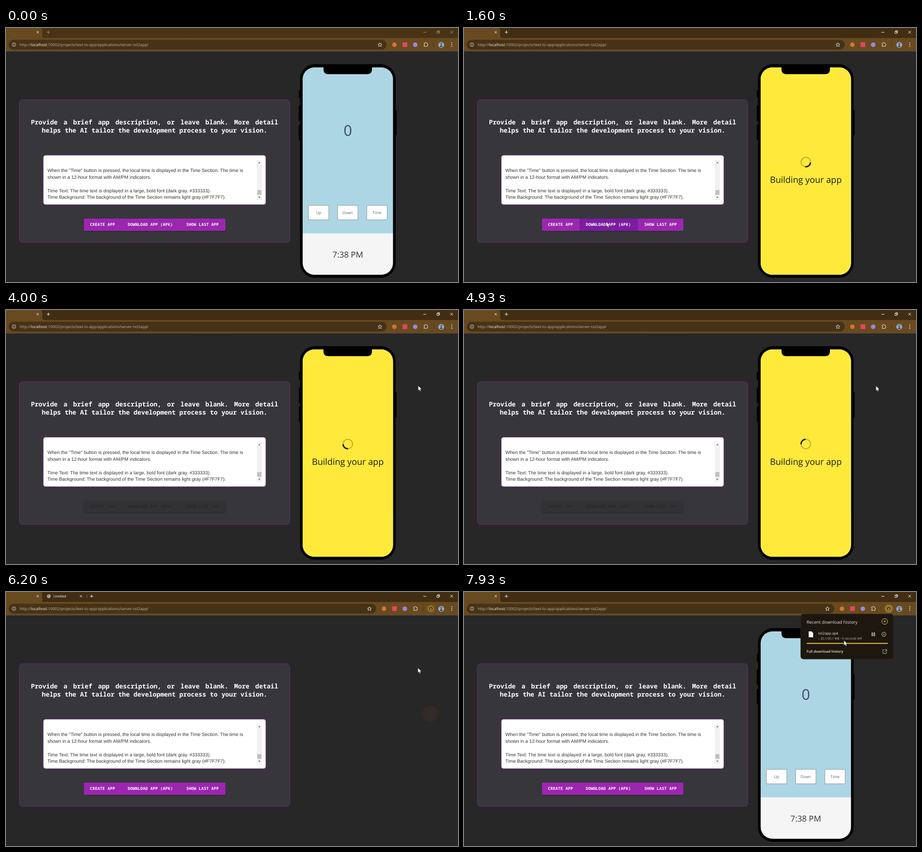
An HTML page for the animation above (8 s loop, 998 by 561 pixels).

```html
<!DOCTYPE html>
<html lang="en">
<head>
<meta charset="utf-8">
<title>App builder</title>
<style>
  html, body { margin: 0; width: 100%; height: 100%; overflow: hidden; background: #272728; }
  svg { position: absolute; left: 0; top: 0; width: 998px; height: 561px; }
  text {
    font-family: "Open Sans", "Noto Sans", sans-serif; white-space: pre;
    text-rendering: geometricPrecision;
  }
  .mid { text-anchor: middle; }
  .line { fill: none; stroke: currentColor; stroke-width: 1; }

  .prompt {
    position: absolute; left: 55px; top: 200px; width: 546px; margin: 0;
    font: bold 14.07px/18px "Noto Sans Mono", "DejaVu Sans Mono", monospace;
    color: #fff; text-align: center; text-rendering: geometricPrecision;
  }
  .prompt span { display: block; white-space: nowrap; }
  .prompt span:first-child { text-align-last: justify; }
  .area text { font: 10.42px "Liberation Sans", Arial, sans-serif; fill: #333; }
  .btns text {
    font: bold 8.9px "Noto Sans Mono", "DejaVu Sans Mono", monospace; letter-spacing: .2px;
  }

  /* Every animation shares the 8 s loop */
  .step, .flow { animation-duration: 8s; animation-iteration-count: infinite; }
  .step { animation-timing-function: step-end; }
  .flow { animation-timing-function: linear; }

  .bar { animation-name: bar; }
  .glyphs { animation-name: glyphs; }
  .shift { animation-name: shift; }
  .tab2 { animation-name: tab2; }
  .plus { animation-name: plus; }
  .dl { animation-name: dl; }
  .ring { animation-name: ring; }
  .glow { animation-name: glow; }
  .phone { animation-name: phone; }
  .build { animation-name: build; }
  .clock { animation-name: clock; }
  .loading { animation-name: loading; }
  .popup { animation-name: popup; }
  .spin { animation-name: spin; }
  .fly { animation-name: fly; }
  .cursor { animation-name: cursor; animation-timing-function: ease-in-out; }
  .btn { animation-name: btn; }
  .btn.hot { animation-name: hot; }
  .label { animation-name: label; }

  @keyframes bar { 0% { fill: #483315 } 17.5%, 100% { fill: #412d12 } }
  @keyframes glyphs { 0% { color: #a5967f } 17.5%, 100% { color: #fff } }
  @keyframes shift { 0% { transform: none } 77.4%, 100% { transform: translateX(-23px) } }
  @keyframes tab2 { 0%, 80.8%, 100% { visibility: hidden } 76.6% { visibility: visible } }
  @keyframes plus { 0%, 80.8%, 100% { transform: none } 76.6% { transform: translateX(95.5px) } }
  @keyframes dl { 0% { visibility: hidden } 77.4%, 100% { visibility: visible } }
  @keyframes ring { 0%, 98.9%, 100% { stroke-dasharray: 36 0 } 87% { stroke-dasharray: 18 18 } }
  @keyframes glow { 0% { opacity: .4 } 87% { opacity: 0 } 94.1%, 100% { opacity: 1 } }
  @keyframes phone { 0%, 80.8%, 100% { visibility: visible } 75.8% { visibility: hidden } }
  @keyframes build { 0%, 75.8%, 100% { opacity: 0 } 18.3% { opacity: 1 } }
  @keyframes clock { 0%, 92.5%, 100% { opacity: 1 } 18.3% { opacity: 0 } }
  @keyframes loading { 0%, 92.5%, 100% { opacity: 0 } 80.8% { opacity: 1 } }
  @keyframes popup { 0% { visibility: hidden } 94.1%, 100% { visibility: visible } }
  @keyframes spin { from { transform: rotate(89deg) } to { transform: rotate(3955deg) } }
  @keyframes fly {
    0%, 77.3% { transform: translate(937px, 270px); opacity: 0 }
    77.5% { transform: translate(937px, 269px); opacity: .12 }
    81% { transform: translate(937px, 180px); opacity: 1 }
    85.5% { transform: translate(937px, 80px); opacity: 1 }
    87%, 100% { transform: translate(937px, 60px); opacity: 0 }
  }
  @keyframes cursor {
    0%, 4% { transform: translate(668px, 466px); opacity: 0 }
    4.1% { transform: translate(668px, 466px); opacity: 1 }
    11.6%, 22.5% { transform: translate(314px, 428px); animation-timing-function: ease-in }
    28% { transform: translate(600px, 484px); animation-timing-function: linear }
    33.4% { transform: translate(940px, 350px); animation-timing-function: ease-out }
    44%, 50% { transform: translate(910px, 167px) }
    60%, 84% { transform: translate(909.5px, 167.5px) }
    90.5%, 94.2% { transform: translate(937px, 38px) }
    98.6%, 100% { transform: translate(839px, 107px); opacity: 1 }
  }
  @keyframes btn {
    0%, 20.6%, 77.3%, 100% { fill: #9c27b0 }
    22.5%, 75.8% { fill: #313035 }
  }
  @keyframes hot {
    0%, 8.8%, 77.3%, 100% { fill: #9c27b0 }
    11.6%, 20.6% { fill: #7b1fa2 }
    22.5%, 75.8% { fill: #313035 }
  }
  @keyframes label {
    0%, 20.6%, 77.3%, 100% { fill: #fff }
    22.5%, 75.8% { fill: #28272b }
  }
</style>
</head>
<body>
<svg viewBox="0 0 998 561">
  <defs>
    <path id="x" d="M-2.3-2.3 2.3 2.3M2.3-2.3-2.3 2.3"/>
    <path id="down" d="M0-3V2.6M-2.5.3 0 2.8 2.5.3"/>
    <linearGradient id="face" x2="0" y2="1">
      <stop stop-color="#6f8fb8"/><stop offset="1" stop-color="#c3c8d2"/>
    </linearGradient>
    <clipPath id="screen"><rect x="655" y="87" width="199.5" height="458" rx="26"/></clipPath>
    <filter id="soft" x="-10%" y="-30%" width="120%" height="170%">
      <feDropShadow dx="0" dy="1" stdDeviation="1" flood-opacity=".3"/>
    </filter>
  </defs>

  <!-- Browser frame -->
  <rect class="step bar" width="998" height="30"/>
  <path fill="#684a20" d="M0 22V0H75q5 0 5 5V17q0 5 5 5H998V51H0Z"/>
  <rect y="51" width="998" height="1" fill="#4b4740"/>
  <g color="#fff"><use href="#x" class="line" x="70" y="9.3"/></g>
  <g class="step glyphs">
    <path class="line step plus" d="M90 9.3h7M93.5 5.8v7"/>
    <path class="line" d="M921.5 9.5h6.5M951.5 7.5h4v4.5h-4ZM953 7.3V6h4.3v4.5h-1.3M981 6.3l6 6M987 6.3l-6 6"/>
  </g>
  <g class="step tab2" color="#fff">
    <circle cx="94.5" cy="9.2" r="4" fill="#b5b2ad"/>
    <path d="M91.5 8q2-2.5 3-.5t-1 2ZM95 12q0-3 3-2.5Z" fill="#5d574e"/>
    <text x="104.7" y="12.4" font-size="7.5" fill="currentColor">Untitled</text>
    <use href="#x" class="line" x="165.5" y="9.3"/>
    <path d="M178.5 5v9" stroke="#80684a"/>
  </g>

  <!-- Toolbar -->
  <rect x="6" y="26" width="500" height="21.5" rx="10.7" fill="#463216"/>
  <g class="step shift" color="#f1ece4">
    <rect x="400" y="26" width="440.5" height="21.5" rx="10.7" fill="#463216"/>
    <path class="line" stroke-linejoin="round" d="M825.5 32.5l1.3 2.9 3.1.3-2.3 2.1.7 3.1-2.8-1.6-2.8 1.6.7-3.1-2.3-2.1 3.1-.3Z"/>
    <circle cx="857.5" cy="37" r="5" fill="#d5752f"/>
    <rect x="875.5" y="31.5" width="10.5" height="10.5" rx="1" fill="#e5455c"/>
    <circle cx="903.5" cy="37" r="5" fill="#9a86df"/>
    <path class="line" stroke-width="1.3" transform="translate(927 36)" d="M-4-2.6H-1.9A1.5 1.5 0 1 1 1.1-2.6H3.2V-.4A1.5 1.5 0 1 1 3.2 2.6V4.6H-4V2.6A1.5 1.5 0 1 0-4-.4Z"/>
    <path d="M944 32.5v9" stroke="#463316"/>
  </g>
  <g color="#e8e0d4">
    <circle class="line" cx="17.5" cy="36.7" r="4"/>
    <path class="line" d="M17.5 36v2.8M17.5 34.2v1"/>
    <text x="30" y="39.9" font-size="8.53" fill="#c4b8a6">http://<tspan fill="#fff">localhost</tspan>:10002/projects/text-to-app/applications/server-txt2app/</text>
  </g>
  <g class="step dl" transform="translate(938 36.7)" color="#f4c440">
    <circle class="step glow" r="10" fill="#86672f"/>
    <circle r="5.4" fill="#4a3818" stroke="#8a744a"/>
    <circle class="line step ring" r="5.4" transform="rotate(-90)"/>
    <use href="#down" class="line"/>
  </g>
  <circle cx="961" cy="37" r="6.5" fill="url(#face)"/>
  <path d="M958 42q0-4 3-4t3 4ZM959.5 35.5a1.5 1.7 0 1 1 3 0 1.5 1.7 0 1 1-3 0" fill="#3c4557"/>
  <g fill="#fff"><circle cx="984.3" cy="32.8" r="1"/><circle cx="984.3" cy="36.7" r="1"/><circle cx="984.3" cy="40.6" r="1"/></g>

  <!-- Form card -->
  <rect x="29.5" y="158.5" width="597" height="315" rx="7" fill="#37363b" stroke="#6d2a7c"/>
  <g class="area">
    <rect x="82.4" y="281.1" width="491.2" height="109" rx="5" fill="#fff" stroke="#9c27b0" stroke-width=".65"/>
    <rect x="554" y="292" width="11" height="88" fill="#f1f1f1"/>
    <rect x="555" y="358" width="9" height="10.5" fill="#c1c1c1"/>
    <path d="M557 298.5l2.3-2.5 2.3 2.5ZM557 372.8l2.3 2.5 2.3-2.5Z" fill="#505050"/>
    <text x="91.5" y="318.4">When the "Time" button is pressed, the local time is displayed in the Time Section. The time is</text>
    <text x="91.5" y="333.1">shown in a 12-hour format with AM/PM indicators.</text>
    <text x="91.5" y="362.6">Time Text: The time text is displayed in a large, bold font (dark gray, #333333).</text>
    <text x="91.5" y="377.3">Time Background: The background of the Time Section remains light gray (#F7F7F7).</text>
  </g>
  <g class="btns">
    <g filter="url(#soft)">
      <path class="flow btn" d="M255.3 421H175q-3 0-3 3v21q0 3 3 3h80.3Z"/>
      <path class="flow btn" d="M384 421h97.5q3 0 3 3v21q0 3-3 3H384Z"/>
      <rect class="flow btn hot" x="255" y="421" width="129.3" height="27"/>
    </g>
    <text class="flow label" x="185.5" y="437.4">CREATE APP</text>
    <text class="flow label" x="269" y="437.4">DOWNLOAD APP (APK)</text>
    <text class="flow label" x="398" y="437.4">SHOW LAST APP</text>
  </g>

  <!-- Phone -->
  <g class="step phone">
    <path d="M646.5 137h4v17h-4ZM646.5 171h4v34h-4ZM646.5 214h4v33h-4ZM858.5 182h4v55h-4Z"/>
    <rect x="649" y="80" width="211.3" height="471.5" rx="33"/>
    <g clip-path="url(#screen)">
      <rect x="655" y="87" width="200" height="367" fill="#add6e4"/>
      <rect x="655" y="453.5" width="200" height="92" fill="#f5f5f5"/>
      <text class="mid" x="754.7" y="238" font-size="32.5" fill="#3a4668">0</text>
      <g fill="#fff" stroke="#8b959a">
        <rect x="667.9" y="391.8" width="44.8" height="31.8"/>
        <rect x="732.2" y="391.8" width="44.8" height="31.8"/>
        <rect x="796.8" y="391.8" width="44.8" height="31.8"/>
      </g>
      <g class="mid" font-size="8.6" fill="#63636b">
        <text x="690.2" y="411.3">Up</text>
        <text x="754.5" y="411.3">Down</text>
        <text x="819.2" y="411.3">Time</text>
      </g>
      <g class="mid" font-size="18.1" fill="#333">
        <text class="step clock" x="754.7" y="507.3">7:38 PM</text>
        <text class="step loading" x="754.7" y="507.3">Loading Time...</text>
      </g>
      <g class="step build">
        <rect x="655" y="87" width="200" height="459" fill="#ffea3b"/>
        <g transform="translate(754.7 296)" fill="none" stroke="#000" stroke-width="2.6">
          <circle r="10.5" stroke-opacity=".22"/>
          <path class="flow spin" d="M-7.4-7.4A10.5 10.5 0 0 1 7.4-7.4"/>
        </g>
        <text class="mid" x="754.7" y="342" font-size="19.3" fill="#1c1a10">Building your app</text>
      </g>
    </g>
    <path d="M701 86H808V91q0 11-11 11H712q-11 0-11-11Z"/>
  </g>

  <!-- Downloads -->
  <g class="flow fly" color="#caa23a">
    <circle r="18" fill="#6b5520"/>
    <path class="line" stroke-width="2" d="M0-8V4M-5-1 0 4 5-1M-7 8H7"/>
  </g>
  <g class="step popup" color="#e9e2d6">
    <rect x="743.5" y="48.5" width="204.5" height="99.5" rx="6" fill="#1d1710" stroke="#2d251b"/>
    <text x="756.5" y="70" font-size="9.75" font-weight="500" fill="#ece6dc">Recent download history</text>
    <g color="#ffd25a"><circle class="line" cx="929" cy="65" r="6.3" stroke-width="1.2"/><use href="#x" class="line" x="929" y="65"/></g>
    <path d="M761 87h6.5l3.5 3.5V100h-10Z" fill="#f4f4f4"/>
    <text x="782" y="94.4" font-size="8" font-weight="500" fill="#ece6dc">txt2app.apk</text>
    <text x="782" y="104.7" font-size="6.8" fill="#c9c1b4">↓ 20.1/20.1 MB • 0 seconds left</text>
    <path class="line" d="M900.5 90h2v7h-2ZM905 90h2v7h-2Z"/>
    <circle class="line" cx="927" cy="93.5" r="4.6"/>
    <use href="#x" class="line" transform="translate(927 93.5) scale(.8)"/>
    <rect x="756.5" y="112.5" width="179.5" height="2" rx="1" fill="#f6c744"/>
    <text x="756.5" y="134.3" font-size="7.8" font-weight="600" fill="#ece6dc">Full download history</text>
    <path class="line" d="M928.5 127.5h-3.5v8h8V132M930 127.5h3.5v3.5M933 128l-4.5 4.5" opacity=".8"/>
  </g>

  <path class="flow cursor" d="M0 0V11L2.4 8.8 4.2 12.5 6.1 11.6 4.5 8H7.8Z" fill="#fff" stroke="#222" stroke-width=".6"/>
</svg>
<p class="prompt"><span>Provide a brief app description, or leave blank. More detail</span><span>helps the AI tailor the development process to your vision.</span></p>
</body>
</html>
```
